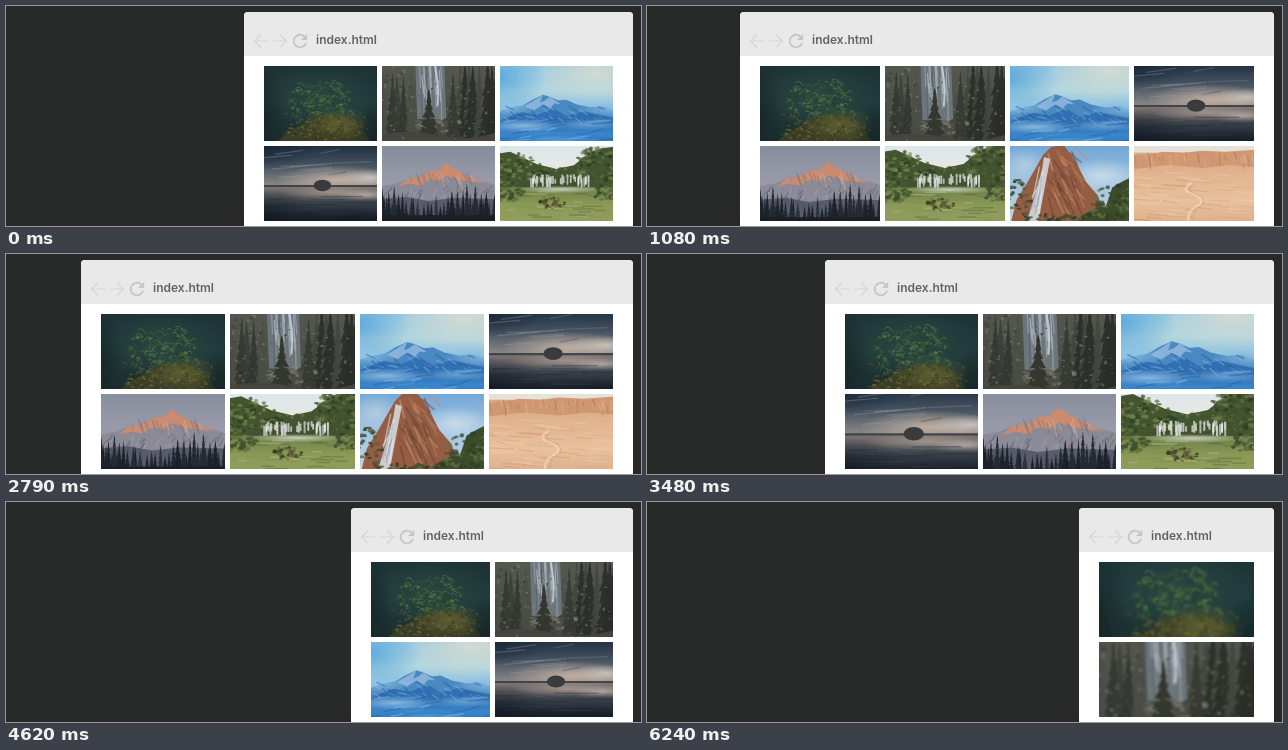
An HTML page for the animation above (6.35 s loop, 635 by 220 pixels).

```html
<!DOCTYPE html>
<html lang="en">
<head>
<meta charset="utf-8">
<title>Responsive photo grid</title>
<style>
  html, body { margin: 0; width: 100%; height: 100%; overflow: hidden; background: #282a29; }
  #stage { display: block; width: 100%; height: 100%; }
  #name { font: 600 12px Inter, Roboto, sans-serif; fill: #636363; }
</style>
</head>
<body>
<svg id="stage" viewBox="0 0 635 220">
  <filter id="soft" x="-20%" y="-20%" width="140%" height="140%"><feGaussianBlur stdDeviation=".65"/></filter>
  <rect width="635" height="220" fill="#282a29"/>
  <path d="M0 216H635V220H0ZM628 0H635V220H628Z" fill="#2a2728"/>
  <path id="page" fill="#fff"/>
  <path id="bar" fill="#e9e9e9"/>
  <g id="tools">
    <path d="M24 35H10.500M17 28.500L10.500 35L17 41.500M29 35H42.500M36 28.500L42.500 35L36 41.500"
      fill="none" stroke="#d6d6d6" stroke-width="1.200"/>
    <path transform="translate(45.200 24.200) scale(.9)" fill="#c6c6c6"
      d="M17.650 6.350A8 8 0 1 0 19.730 14H17.650A6 6 0 1 1 16.220 7.780L13 11H20V4Z"/>
    <text id="name" x="72" y="38">index.html</text>
  </g>
  <g id="grid"></g>
</svg>
<script>
const $ = id => document.getElementById(id);

// Seeded random numbers
let seed = 7;
const rnd = (a = 0, b = 1) => {
  seed = (seed * 16807) % 2147483647;
  return a + (b - a) * seed / 2147483647;
};
const pick = list => list[Math.floor(rnd(0, list.length))];
const repeat = (n, draw) => Array.from({ length: n }, (_, i) => draw(i)).join('');

// Drawing helpers; every photo is 120 by 80 units
const shape = (d, fill, o = 1) => `<path d="${d}" fill="${fill}" opacity="${o}"/>`;
const line = (d, color, w, o = 1) =>
  `<path d="${d}" fill="none" stroke="${color}" stroke-width="${w}" opacity="${o}" stroke-linecap="round"/>`;
const oval = (x, y, rx, ry, fill, o = 1) =>
  `<ellipse cx="${x.toFixed(1)}" cy="${y.toFixed(1)}" rx="${rx.toFixed(1)}" ry="${ry.toFixed(1)}" fill="${fill}" opacity="${o}"/>`;

let gradients = 0;
const fade = (y, h, ...stops) => {
  const id = 'fade' + gradients++;
  const marks = stops.map((c, i) =>
    `<stop offset="${i / (stops.length - 1)}" stop-color="${c}"/>`).join('');
  return `<linearGradient id="${id}" x2="0" y2="1">${marks}</linearGradient>
    <rect y="${y}" width="120" height="${h}" fill="url(#${id})"/>`;
};
const glow = (x, y, rx, ry, color, o = 1) => {
  const id = 'fade' + gradients++;
  return `<radialGradient id="${id}"><stop stop-color="${color}"/>
    <stop offset="1" stop-color="${color}" stop-opacity="0"/></radialGradient>` +
    oval(x, y, rx, ry, `url(#${id})`, o);
};

const leaves = (n, x, y, rx, ry, size, colors, o = .75) => repeat(n, () => {
  const a = rnd(0, 2 * Math.PI), r = Math.sqrt(rnd());
  return oval(x + Math.cos(a) * r * rx, y + Math.sin(a) * r * ry,
    rnd(.5, 1) * size, rnd(.3, .7) * size, pick(colors), o);
});
const blades = (n, x, y, rx, ry, len, colors, o = .7) => repeat(n, () => {
  const px = x + rnd(-rx, rx), py = y + rnd(-ry, ry), side = rnd(-len, len);
  return line(`M${px} ${py}q${side / 2} ${-len / 2} ${side} ${rnd(-.3, .5) * len}`, pick(colors), .8, o);
});
const streaks = (n, x0, x1, y0, y1, dx, dy, colors, w, o) => repeat(n, () =>
  line(`M${rnd(x0, x1)} ${rnd(y0, y1)}l${dx * rnd(.3, 1)} ${dy * rnd(.3, 1)}`, pick(colors), w, o));
const pine = (x, top, base, w, fill, o = 1) => {
  const right = [], left = [], tiers = 7;
  for (let i = 1; i <= tiers; i++) {
    const y = top + (base - top) * i / tiers, half = w / 2 * i / tiers * rnd(.8, 1.15);
    right.push(`${x + half} ${y} ${x + half * .55} ${y - .5}`);
    left.unshift(`${x - half * .55} ${y - .5} ${x - half} ${y}`);
  }
  return shape(`M${x} ${top}L${right.join(' ')} ${left.join(' ')}Z`, fill, o);
};
const pines = (n, x0, x1, top, base, w, colors, o = 1) => repeat(n, i =>
  pine(x0 + (x1 - x0) * (i + rnd(0, .8)) / n, top + rnd(-6, 6), base, w * rnd(.8, 1.3), pick(colors), o));

const fern = () => fade(0, 80, '#1d3236', '#203a3b', '#1b2c2c') +
  glow(60, 32, 60, 34, '#2f4d45', .7) +
  shape('M14 80Q40 58 66 52Q94 45 112 80Z', '#3d4023', .9) +
  glow(78, 60, 34, 18, '#6f6c38', .7) +
  leaves(100, 66, 66, 44, 14, 2, ['#5d5c30', '#2f351f', '#716c3c', '#454c28'], .6) +
  blades(80, 66, 63, 42, 13, 6, ['#85804c', '#5f6234', '#262e1e'], .6) +
  leaves(110, 60, 38, 33, 18, 2.4, ['#3d5c36', '#527440', '#2c4a34', '#24402f'], .65) +
  blades(90, 60, 35, 32, 18, 7, ['#6a8c4a', '#48713f', '#26432f'], .65) +
  glow(0, 50, 24, 55, '#142324', .7) + glow(120, 75, 26, 40, '#142324', .7);

const forest = () => fade(0, 80, '#55584f', '#4d5049', '#4a4942') +
  shape('M36 0H66L68 56H38Z', '#6f7980', .9) +
  streaks(26, 40, 64, -5, 28, 2, 34, ['#a4afb7', '#86939d', '#566069', '#c3ccd3'], 1.2, .6) +
  line('M56 0Q61 22 59 42', '#dbe1e5', 2, .7) +
  leaves(45, 16, 38, 20, 36, 3, ['#6b6f63', '#3c4039', '#7c8074'], .5) +
  pines(6, -4, 36, 6, 78, 16, ['#393d36', '#4a4e45', '#30342e'], .8) +
  pines(8, 78, 124, -4, 80, 20, ['#33372f', '#424640', '#2a2e28'], .9) +
  leaves(40, 58, 62, 26, 10, 3, ['#6f7068', '#898a80', '#3d3e38'], .6) +
  pine(50, 24, 78, 22, '#33372f') + pine(75, 8, 76, 18, '#373b33') +
  shape('M0 72Q30 66 60 73T120 70V80H0Z', '#45443d') +
  leaves(120, 60, 46, 66, 36, 1.6, ['#83857a', '#262a24', '#94968a', '#53564c'], .5);

const blueRange = () => fade(0, 80, '#9ac9e2', '#b4d6df', '#7cb8df', '#3682c6') +
  glow(100, 8, 65, 28, '#d8dccf', .9) + glow(0, 14, 50, 34, '#55a6dc', .9) +
  shape('M0 48L13 44L25 42L35 36L46 31L53 33L62 37L70 36L81 41L95 44L108 43L120 47V80H0Z', '#4a88c2') +
  glow(8, 44, 34, 10, '#8fc4e6', .8) + glow(114, 46, 34, 9, '#86b8de', .8) +
  shape('M27 43L46 31L43 39L48 37L53 33L65 41L58 40L53 45L46 41L37 47Z', '#9bbfdf', .75) +
  shape('M0 58L24 49L40 52L57 45L70 53L88 48L120 55V80H0Z', '#2c6bb0', .85) +
  streaks(34, 5, 105, 42, 56, 9, 6, ['#8db8de', '#23589b', '#5b94cc'], 1.1, .55) +
  fade(62, 18, '#2d6cb2', '#3a86cb', '#2f78c0') +
  glow(25, 63, 46, 7, '#9ccbea', .8) + glow(94, 62, 42, 6, '#7fb4df', .7) +
  streaks(24, -10, 105, 58, 79, 26, -3, ['#8bc1e8', '#2260a8', '#569cd6'], 1.4, .45) +
  glow(62, 79, 42, 6, '#74b4e2', .6);

const lake = () => fade(0, 43, '#1e2e3f', '#465361', '#8d8a89') +
  glow(76, 36, 62, 15, '#cbb7a7', .85) + glow(112, 34, 34, 9, '#e0d6cc', .7) +
  glow(0, 4, 55, 22, '#152637', .8) +
  streaks(18, -10, 80, 6, 34, 50, -4, ['#8b939b', '#2b3a49', '#a8a5a2'], 1.2, .3) +
  fade(43, 37, '#7e7674', '#353c46', '#141c25') +
  glow(74, 49, 56, 8, '#b7a79b', .7) + glow(108, 52, 32, 6, '#d4cac1', .6) +
  shape('M0 41.500H120V43.500H0Z', '#2c3036', .8) +
  oval(62, 42, 9, 6, '#3b3a3d') +
  streaks(18, -10, 80, 52, 72, 55, 0, ['#131d28', '#59606a'], 1, .3) +
  glow(0, 76, 62, 30, '#101923', .85) + glow(90, 82, 70, 18, '#101821', .8);

const sunset = () => fade(0, 80, '#858c9b', '#9a9baa', '#8a8996') +
  shape('M0 43L16 40L28 35L41 33L51 27L60 26L68 19L75 24L88 31L98 36L111 39L120 42V80H0Z', '#8b8a97') +
  shape('M18 43L28 35L41 33L51 27L60 26L68 19L75 24L88 31L98 36L110 40L93 38L84 37L76 35L68 32L60 38L50 36L40 42L30 40Z', '#cb8b70') +
  streaks(34, 28, 94, 28, 38, 4, 10, ['#deaa8b', '#79747f', '#a07469', '#a5a3ae'], 1.1, .6) +
  streaks(34, 0, 118, 42, 54, -5, 8, ['#a5a4af', '#696b7a', '#5a5d6c'], 1.4, .5) +
  shape('M0 56L26 54L50 58L75 55L120 56V80H0Z', '#4c515f', .8) +
  pines(30, -4, 122, 58, 84, 8, ['#20262f', '#2b313b', '#191e26'], .95) +
  pines(6, -2, 34, 47, 84, 9, ['#1d222b', '#252b35']) +
  pines(9, 70, 120, 46, 84, 9, ['#1c212a', '#252a34']) +
  shape('M0 73H120V80H0Z', '#1a1f27');

const cascades = () => fade(0, 80, '#dce5ea', '#e6e9e4', '#9aa574', '#838f56') +
  shape('M0 9L12 7L27 14L40 20L60 25L78 21L92 10L104 4L120 2V48H0Z', '#435530') +
  leaves(120, 17, 28, 29, 19, 3, ['#5c6f3b', '#2c3e24', '#43562e', '#7a8450'], .7) +
  leaves(120, 102, 24, 24, 23, 3, ['#4f6337', '#293a22', '#3c4f2a', '#717b48'], .7) +
  leaves(60, 62, 31, 30, 8, 2.5, ['#475a31', '#6c7848', '#2b3c24'], .7) +
  shape('M25 37H100L108 47H20Z', '#46502f') +
  streaks(38, 32, 94, 31, 37, 0, 11, ['#eef1ee', '#cfd8d4', '#dfe5e0'], 1.8, .75) +
  fade(44, 36, '#6f7f4a', '#8c9a57', '#929d60') +
  glow(64, 46, 46, 4, '#d9e1d2', .8) +
  streaks(40, -10, 105, 48, 79, 22, 0, ['#b4bd8c', '#5a6b3b', '#7d8d4e'], 1.4, .45) +
  leaves(40, 8, 50, 18, 9, 3, ['#3b4d2a', '#5f6f3d']) +
  leaves(45, 55, 60, 14, 6, 2.5, ['#4c5230', '#6f6c43', '#343d25']) +
  leaves(30, 112, 50, 14, 8, 3, ['#34462a', '#57683a']);

const cliff = () => fade(0, 80, '#6ea4d6', '#9fc4e2', '#c9d7de') +
  glow(92, 32, 36, 16, '#dfe7ec', .7) + glow(16, 22, 24, 18, '#c3d4df', .7) +
  shape('M2 80L8 56L18 40L26 26L34 12L42 4L54 2L61 11L68 22L76 38L88 52L98 80Z', '#945d44') +
  streaks(50, 38, 70, 6, 56, 12, 24, ['#b97b58', '#6a4535', '#7f513d', '#c68b69'], 1.8, .55) +
  leaves(45, 9, 58, 17, 24, 3, ['#3f4a2f', '#2d3925', '#5c5e40']) +
  shape('M35 14L41 16Q36 42 29 80H17Q27 50 33 26Z', '#d8dfe5', .85) +
  streaks(12, 26, 34, 22, 45, -8, 32, ['#9ca9b3', '#f0f3f5'], 1.3, .55) +
  shape('M62 80Q78 64 96 62L102 44L112 38L120 34V80Z', '#3c4c2b') +
  leaves(80, 104, 62, 22, 22, 3, ['#465930', '#2b3c23', '#627344', '#38492a'], .7) +
  leaves(60, 56, 76, 44, 7, 3, ['#3d4829', '#29341f', '#5f643f'], .75);

const desert = () => fade(0, 12, '#dfe2dd', '#eae1d4') +
  fade(10, 70, '#d6a783', '#e2b690', '#e8c19d', '#dcae87') +
  shape('M0 13L22 11L29 9L51 10L67 8L91 9L120 7V24L94 22L68 25L35 22L0 26Z', '#cf9772') +
  streaks(40, 0, 118, 10, 16, 2, 11, ['#e4b892', '#b97f5c', '#dea781'], 1.4, .55) +
  streaks(60, -8, 110, 27, 79, 26, 2, ['#f1d2b1', '#cb946d', '#d8a67f'], 1.1, .45) +
  line('M57 40Q46 46 58 50T66 60Q50 67 56 82', '#f1d6b7', 2, .8) +
  line('M60 41Q50 46 61 50T69 60Q55 67 60 82', '#c4936d', .8, .55);

const boulder = (x, y, rx, ry) => oval(x, y, rx, ry, '#2c2e2c') +
  oval(x - rx * .15, y - ry * .4, rx * .65, ry * .35, '#545653', .6);
const boulders = () => fade(0, 50, '#899c94', '#cbd5cb', '#d8ddcf') +
  glow(62, 20, 48, 25, '#e8e8dc', .8) +
  leaves(35, 2, 17, 20, 23, 6, ['#6c7e68', '#899a84'], .45) +
  leaves(35, 117, 17, 18, 23, 6, ['#71816d', '#8b9985'], .45) +
  shape('M0 46Q35 41 72 45T120 44V56H0Z', '#62734c') +
  fade(51, 29, '#70834a', '#5e7837', '#4c642f') +
  blades(60, 60, 67, 60, 12, 4, ['#87974f', '#4b632c', '#6a813d'], .55) +
  boulder(41, 51, 8, 6) + boulder(62, 45, 10, 9) + boulder(83, 44, 11, 11) +
  boulder(19, 44, 12, 11) + boulder(17, 63, 15, 9) + boulder(67, 64, 12, 9) +
  boulder(101, 64, 13, 11) + boulder(110, 50, 8, 6);

const valley = () => fade(0, 80, '#9d97bd', '#c3aec7', '#d9c3cd', '#a49bae', '#696572') +
  shape('M0 35L12 29L20 31L32 24L44 31L56 27L66 31L79 23L91 30L105 26L120 31V54H0Z', '#918dac') +
  streaks(22, 0, 116, 27, 34, 6, 5, ['#d7cbd9'], 1.3, .6) +
  shape('M0 44L20 39L45 45L72 39L95 43L120 38V64H0Z', '#77768c') +
  glow(60, 50, 70, 8, '#c7bac9', .75) +
  shape('M0 54Q20 46 42 55Q70 62 91 53L120 49V80H0Z', '#5d606c') +
  glow(76, 61, 38, 6, '#9691a1', .65) +
  shape('M0 64Q25 57 51 67T120 65V80H0Z', '#4c4b4c') +
  leaves(48, 60, 72, 66, 9, 3, ['#635b53', '#393c3d', '#77695d', '#4b514b'], .7);

// The view leaves out the rim, where the blur fades
const photos = [fern, forest, blueRange, lake, sunset, cascades, cliff, desert, boulders, valley];
$('grid').innerHTML = photos.map(draw =>
  `<svg viewBox="1.5 1 117 78" preserveAspectRatio="xMidYMid slice" height="75">
    <g filter="url(#soft)">${draw()}</g></svg>`).join('');
const cells = [...$('grid').children];

// Left edge of the window while it is dragged: [ms, px]
const drag = [
  [0, 238], [270, 203], [660, 132], [930, 104], [1080, 93], [1200, 74], [1350, 53],
  [1500, 41], [1740, 28], [2010, 27], [2130, 30], [2400, 38], [2550, 49], [2790, 75],
  [2940, 98], [3330, 157], [3480, 178], [3600, 198], [3750, 215], [3900, 231], [4050, 254],
  [4200, 270], [4470, 322], [4620, 345], [4740, 356], [4890, 367], [5040, 394],
  [5310, 414], [5700, 425], [5970, 432], [6350, 432]
];
const LOOP = 6350;

// The drag advances in short runs: 120 ms per step, 150 ms after the last one
const ticks = [];
let clock = 0;
for (const run of '1232214223132111122112322') {
  for (let i = 1; i <= run; i++) {
    ticks.push(clock);
    clock += i < run ? 120 : 150;
  }
}

const edgeAt = t => {
  const i = Math.max(1, drag.findIndex(([time]) => time >= t));
  const [t0, x0] = drag[i - 1], [t1, x1] = drag[i];
  return Math.round(x0 + (x1 - x0) * (t - t0) / (t1 - t0));
};

const RIGHT = 627, TOP = 6, PAD = 20, GAP = 5, MIN = 100, ROW = 75;

function render(t) {
  const x = edgeAt(ticks.filter(tick => tick <= t).pop());
  const outline = bottom =>
    `M${x} ${bottom}V${TOP + 4}Q${x} ${TOP} ${x + 4} ${TOP}H${RIGHT - 4}Q${RIGHT} ${TOP} ${RIGHT} ${TOP + 4}V${bottom}Z`;
  $('page').setAttribute('d', outline(220));
  $('bar').setAttribute('d', outline(50));
  $('tools').setAttribute('transform', `translate(${x})`);

  const inner = RIGHT - x - 2 * PAD;
  const cols = Math.floor((inner + GAP) / (MIN + GAP));
  const width = (inner - GAP * (cols - 1)) / cols;
  cells.forEach((cell, i) => {
    const col = i % cols, row = Math.floor(i / cols);
    const left = Math.round(x + PAD + col * (width + GAP));
    const right = Math.round(x + PAD + col * (width + GAP) + width);
    cell.setAttribute('x', left);
    cell.setAttribute('y', 60 + row * (ROW + GAP));
    cell.setAttribute('width', right - left);
    cell.style.display = row < 2 ? '' : 'none';
  });
}

const start = performance.now();
let shown = -1;
function play() {
  const t = (performance.now() - start) % LOOP;
  const step = ticks.filter(tick => tick <= t).length;
  if (step !== shown) render(t);
  shown = step;
  requestAnimationFrame(play);
}
play();
</script>
</body>
</html>
```
